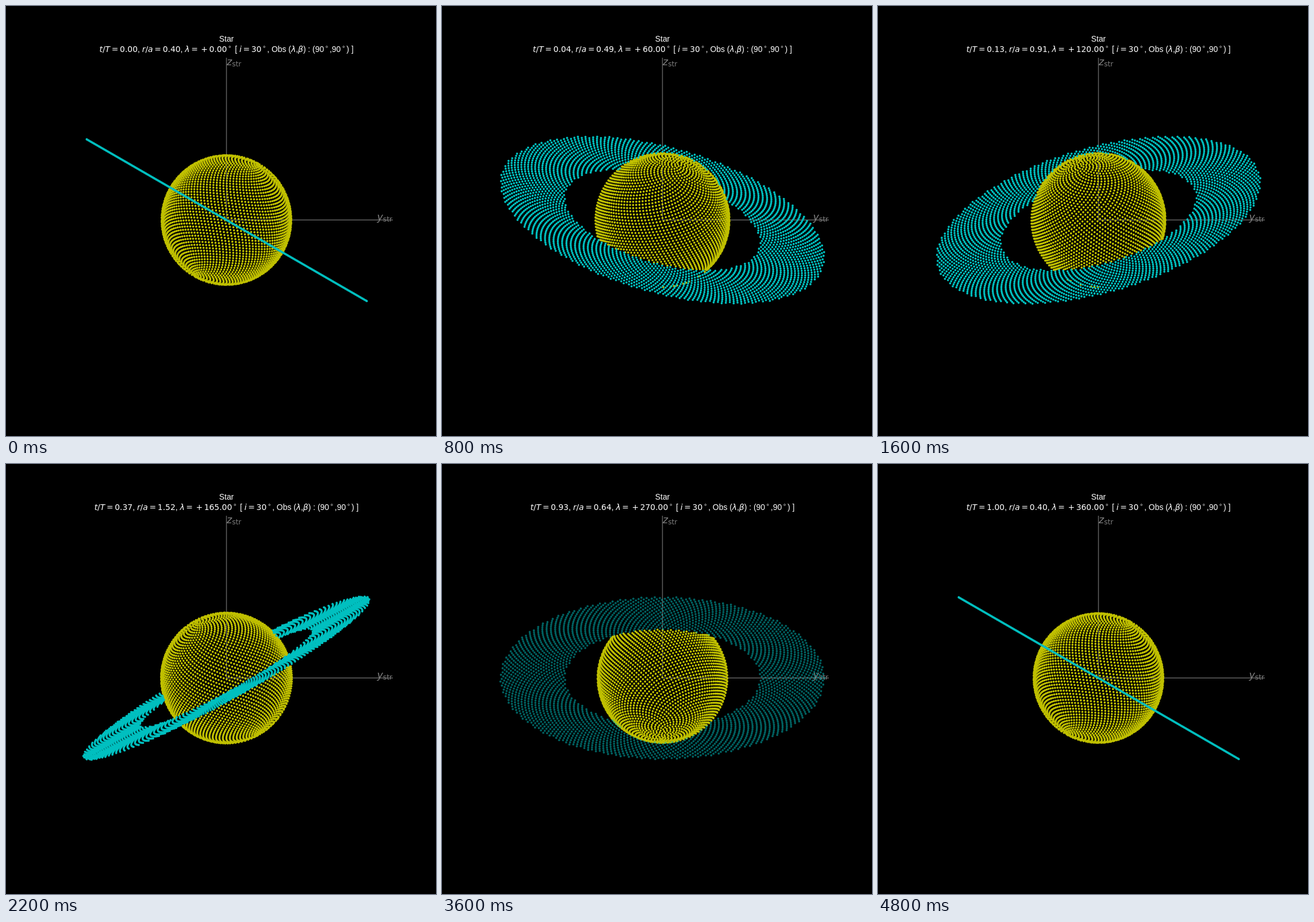
Animation of 748x748 px, one loop 5 s. Source, as an HTML page with a canvas:

```html
<!DOCTYPE html>
<html lang="en">
<head>
<meta charset="utf-8">
<title>Star</title>
<style>
html, body { margin: 0; width: 100%; height: 100%; overflow: hidden; background: #000; }
canvas { display: block; }
</style>
</head>
<body>
<canvas id="stage" width="748" height="748"></canvas>
<script>
const ctx = document.getElementById('stage').getContext('2d');
const STEP = 200, STEPS = 25;
const CX = 383.5, CY = 372.3;
const SCALE = 282.2, DOT = 1.9;
const BALL = 0.4, INNER = 0.6, ECC = 0.6;
const TILT = Math.PI / 6, TURN = Math.PI * (1 + Math.sqrt(5));
const COUNT = 5000;

// Tilt a point about the x axis, into the fixed frame.
function tilt(x, y, z) {
  const c = Math.cos(TILT), s = Math.sin(TILT);
  return [x, y * c + z * s, z * c - y * s];
}

// Golden-angle spirals; the ring winds opposite to the ball.
const ball = [], ring = [];
for (let k = 0; k < COUNT; k++) {
  const u = (k + 0.5) / COUNT, a = TURN * (k + 0.5);
  const h = 1 - 2 * u, q = BALL * Math.sqrt(1 - h * h);
  ball.push(tilt(q * Math.cos(a), q * Math.sin(a), BALL * h));
  const r = Math.sqrt(u);
  if (r >= INNER) ring.push(tilt(r * Math.cos(a), -r * Math.sin(a), 0));
}
const pole = tilt(0, 0, 1);

// View frame: x towards the viewer, y right, z up.
function turn([x, y, z], lon) {
  const c = Math.cos(lon), s = Math.sin(lon);
  return [x * c + y * s, y * c - x * s, z];
}

function behindRing([x, y, z], n) {
  if (Math.abs(n[0]) < 1e-9) return false;
  const t = -(x * n[0] + y * n[1] + z * n[2]) / n[0];
  if (t <= 0) return false;
  const rim = x < 0.0085 && y * n[0] * n[1] > 1e-9;
  const d = Math.hypot(x + t, y, z);
  return !rim && d > INNER && d < 1;
}

function dots(points, scale, color, alpha) {
  ctx.fillStyle = color;
  ctx.globalAlpha = alpha;
  ctx.beginPath();
  for (const [, y, z] of points) {
    const px = CX + y * scale, py = CY - z * scale;
    if (alpha < 1) ctx.beginPath();
    ctx.moveTo(px + DOT, py);
    ctx.arc(px, py, DOT, 0, 7);
    if (alpha < 1) ctx.fill();
  }
  if (alpha === 1) ctx.fill();
  ctx.globalAlpha = 1;
}

const EM = 13.89;
const SANS = '"Liberation Sans", Arial, sans-serif';
const MATH = '"DejaVu Sans", sans-serif';
const FONTS = {
  text: `${EM}px ${SANS}`,
  num: `${EM}px ${MATH}`,
  op: `${EM}px ${MATH}`,
  it: `italic ${EM}px ${MATH}`,
  deg: `${EM * 0.7}px ${MATH}`
};
const PADS = { op: 0.195 * EM, deg: 0.137 * EM };
const DEG = ['deg', '\u2218'];

function equation(left, right, sign) {
  const parts = left.split('/').flatMap((s, i) => i ? [['num', '/'], ['it', s]] : [['it', s]]);
  if (sign) return [...parts, ['op', '='], ['op', sign], ['num', right]];
  return [...parts, ['op', '='], ['num', right]];
}

function drawRow(parts, y) {
  const items = parts.map(([kind, str]) => {
    ctx.font = FONTS[kind];
    const pad = PADS[kind] || 0;
    return { kind, str, pad, width: ctx.measureText(str).width + 2 * pad };
  });
  let x = CX - items.reduce((sum, p) => sum + p.width, 0) / 2;
  for (const p of items) {
    ctx.font = FONTS[p.kind];
    ctx.fillText(p.str, x + p.pad, y - (p.kind === 'deg' ? 0.4 * EM : 0));
    x += p.width;
  }
}

function drawTitle(lon) {
  const half = lon / 2;
  const E = 2 * Math.atan2(Math.sqrt((1 - ECC) / (1 + ECC)) * Math.sin(half), Math.cos(half));
  const time = (E - ECC * Math.sin(E)) / (2 * Math.PI);
  const dist = (1 - ECC * ECC) / (1 + ECC * Math.cos(lon));
  const angle = (lon * 180 / Math.PI).toFixed(2);
  ctx.fillStyle = '#fff';
  drawRow([['text', 'Star']], 62);
  drawRow([
    ...equation('t/T', time.toFixed(2)), ['text', ', '],
    ...equation('r/a', dist.toFixed(2)), ['text', ', '],
    ...equation('λ', angle, '+'), DEG, ['text', ' [ '],
    ...equation('i', '30'), DEG, ['text', ', Obs ('],
    ['it', 'λ'], ['text', ','], ['it', 'β'],
    ['text', ') : (90'], DEG, ['text', ',90'], DEG, ['text', ') ]']
  ], 79.5);
}

function axisLabel(name, x, y) {
  const size = 17.4;
  ctx.fillStyle = '#808080';
  ctx.font = `italic ${size}px ${MATH}`;
  ctx.fillText(name, x, y);
  const w = ctx.measureText(name).width;
  ctx.font = `${size * 0.7}px ${MATH}`;
  ctx.fillText('str', x + w, y + 2.3);
}

function drawAxes() {
  ctx.strokeStyle = '#606060';
  ctx.lineWidth = 1.5;
  ctx.beginPath();
  ctx.moveTo(CX, 90);
  ctx.lineTo(CX, CY);
  ctx.lineTo(673, CY);
  ctx.stroke();
  axisLabel('z', 384, 102.7);
  axisLabel('y', 645.5, 373);
}

function draw(step) {
  const lon = step * Math.PI / 12;
  const n = turn(pole, lon);
  // The wider horizontal extent of the ring always fills the view.
  const scale = SCALE / Math.sqrt(1 - Math.min(n[0] * n[0], n[1] * n[1]));
  const view = p => turn(p, lon);
  const front = ball.map(view).filter(p => p[0] > 0 && !behindRing(p, n));
  const disc = ring.map(view).filter(([x, y, z]) => x > 0 || Math.hypot(y, z) > BALL);

  ctx.fillStyle = '#000';
  ctx.fillRect(0, 0, 748, 748);
  drawAxes();
  dots(front, scale, '#bfbf00', 1);
  dots(disc, scale, '#00bfbf', n[0] < -1e-9 ? 0.5 : 1);
  drawTitle(lon);
}

const start = performance.now();
let shown = -1;
function tick() {
  const step = Math.floor((performance.now() - start) / STEP) % STEPS;
  if (step !== shown) draw(shown = step);
  requestAnimationFrame(tick);
}
tick();
</script>
</body>
</html>
```
